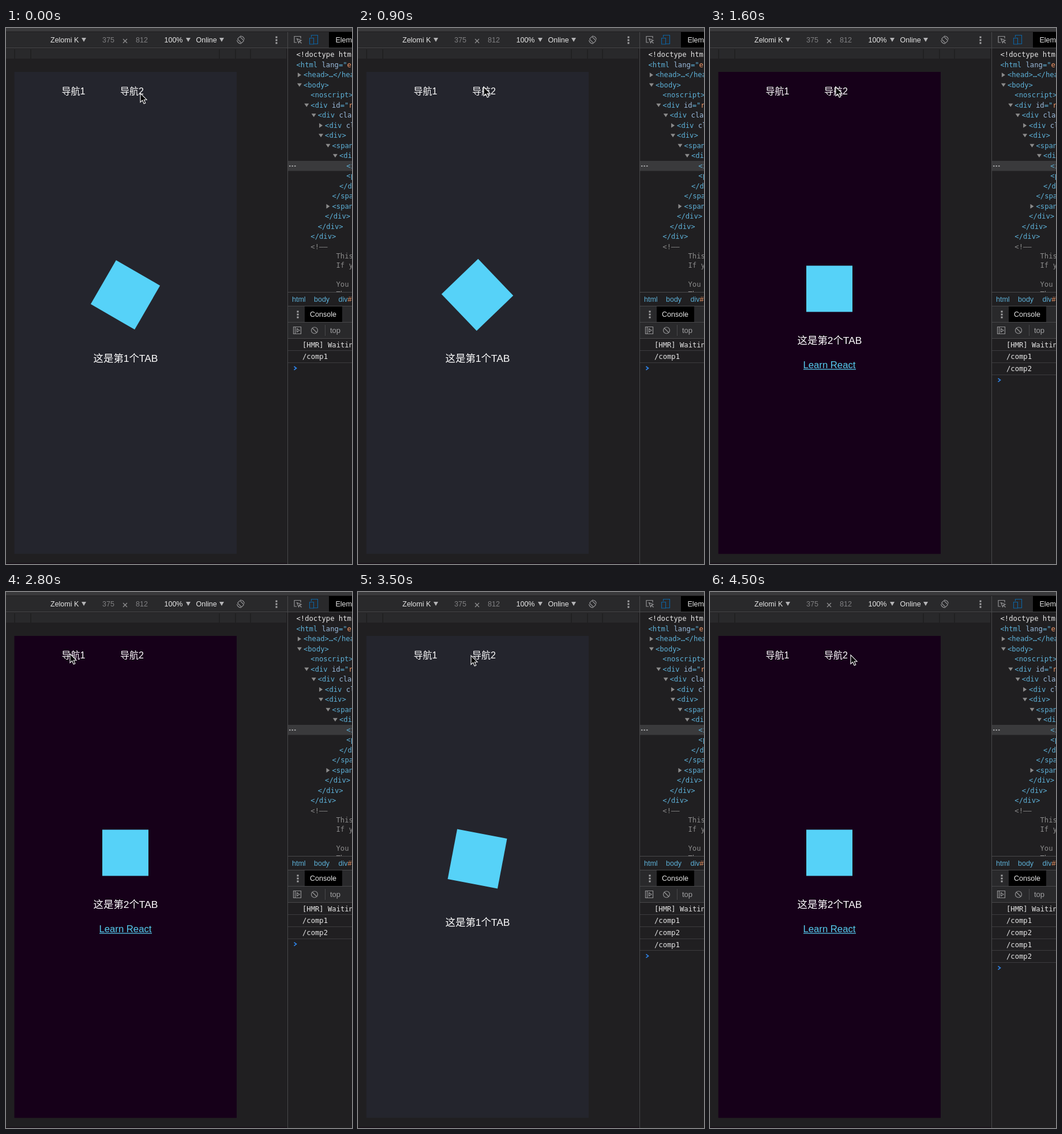
Write an HTML page that moves like this. It is 600 px wide and 928 px high and loops after 4.6 s.

```html
<!DOCTYPE html>
<html lang="zh">
<meta charset="utf-8">
<style>
html, body { margin: 0; height: 100%; overflow: hidden; background: #201f21 }
svg { display: block; font: 12.5px "Liberation Sans", Arial, sans-serif; fill: #e6e6e6 }
.cjk { font-family: "Liberation Sans", "Noto Sans CJK SC", "Noto Sans CJK", sans-serif; fill: #fff }
.mono { font: 12.2px "DejaVu Sans Mono", monospace }
.tag { fill: #5db0d7 }
.attr { fill: #9bbbdc }
.val { fill: #f29766 }
.dim { fill: #8b8b8b }
.rule { stroke: #48484a; fill: none }
.icon { stroke: #929294; fill: none; stroke-width: 1.2 }
</style>
<svg width="600" height="928" viewBox="0 0 600 928">
  <path fill="#39393b" d="M0 0H600V6H0Z"/>
  <path fill="#29292b" d="M0 7H600V34H0ZM0 36H486V53H0Z"/>
  <path stroke="#1f1f21" stroke-width="1.5" d="M15 37V53M43 37V53M370 37V53M398 37V53M424 37V53"/>
  <path fill="#1a131a" d="M0 926H488V928H0Z"/>

  <!-- device toolbar -->
  <text x="77" y="25">Zelomi K</text>
  <text x="167" y="25" fill="#818183">375</text>
  <text x="225" y="25" fill="#818183">812</text>
  <text x="274.5" y="25">100%</text>
  <text x="329.5" y="25">Online</text>
  <path fill="#b4b4b6" d="M131 17h8l-4 7zM312 17h8l-4 7zM370 17h8l-4 7z"/>
  <path class="icon" d="M203 19l7 7m0-7l-7 7"/>
  <g class="icon">
    <rect x="404" y="15.5" width="6" height="10" rx="1" transform="rotate(-45 407 20.5)"/>
    <path d="M406 14.2A6.5 6.5 0 0 1 413.4 20M408 26.8A6.5 6.5 0 0 1 400.6 21"/>
  </g>
  <path id="dots" fill="#a2a2a4" d="M467.5 14.5h3v3h-3zM467.5 19.5h3v3h-3zM467.5 24.5h3v3h-3z"/>

  <!-- phone -->
  <rect id="screen" x="14.5" y="76" width="385.5" height="834.5"/>
  <rect id="mark1" x="97" y="97" width="40" height="22" fill="#24527a"/>
  <rect id="mark2" x="198" y="97" width="42.5" height="22" fill="#24527a"/>
  <g class="cjk" font-size="16">
    <text id="nav1" x="96.5" y="114.5">导航1</text>
    <text id="nav2" x="198" y="114.5">导航2</text>
  </g>
  <rect id="logo" fill="#56d2f8"/>
  <text id="title" class="cjk" x="207.5" text-anchor="middle" font-size="17.4"></text>
  <g id="learn" fill="#56cdf0">
    <text x="161.5" y="589" font-size="16.7">Learn React</text>
    <path d="M162 590.3H253V591.5H162Z"/>
  </g>

  <!-- inspector -->
  <path fill="#201f21" d="M489 35H600V928H489Z"/>
  <path fill="#3a3a3c" d="M489 230H600V247.5H489Z"/>
  <g class="mono" id="tree"></g>
  <path fill="#a0a0a2" d="M491 238h2.5v2h-2.5zM495.5 238h2.5v2h-2.5zM500 238h2.5v2h-2.5z"/>
  <path fill="#201f21" d="M489 458H600V481H489Z"/>
  <path fill="#29292b" d="M489 482H600V537H489Z"/>
  <path fill="#000" d="M560 7H600V34H560ZM518 482H583V509H518Z"/>
  <text x="571.5" y="25">Elements</text>
  <g class="tag">
    <text x="496" y="474">html</text>
    <text x="534" y="474">body</text>
    <text x="576.5" y="474">div<tspan class="val">#root</tspan></text>
  </g>
  <use href="#dots" x="37" y="475"/>
  <text x="527" y="500">Console</text>
  <text x="562" y="528" font-size="13" fill="#a0a0a2">top</text>
  <path class="rule" d="M488.5 7V928M0 34.5H600M489 457.5H600M489 481.5H600M489 509.5H600M489 537.5H600M553.5 514V533"/>
  <g class="icon">
    <path d="M504 25H500V14.5H511V18M504.5 18.5l7.5 3-3 1.2-1.5 3zM508.5 22.5l4 4"/>
    <path stroke="#0e629f" d="M529.5 16V12.5H540.5V27.5H534M526.5 17.5H533.5V28H526.5Z"/>
    <path d="M498.5 517.5H511.5V529.5H498.5ZM501.5 517.5V529.5M504.5 520.5l4.5 3-4.5 3z"/>
    <circle cx="535" cy="523.5" r="5.5"/>
    <path d="M531 519.5l8 8"/>
  </g>
  <g class="mono" id="log"></g>
  <path id="prompt" d="M499.5 -3l4 3-4 3" fill="none" stroke="#2e86ee" stroke-width="1.6"/>

  <path id="cursor" d="M0 0V15.5L3.6 12.2 6.2 18 8.8 16.9 6.3 11.2H11Z" fill="#000" stroke="#fff" stroke-width="1.1"/>
</svg>
<script>
const $ = id => document.getElementById(id);
const set = (id, attrs) => { for (const k in attrs) $(id).setAttribute(k, attrs[k]); };
const show = (id, on) => set(id, { visibility: on ? 'visible' : 'hidden' });
const esc = s => s.replace(/</g, '&lt;');

// Element tree: depth, arrow (v open, > closed), tag, attribute, value
const rows = [
  [0, '', '<!doctype html>'], [0, '', '<html', 'lang', 'en'], [1, '>', '<head>…</head>'], [1, 'v', '<body>'],
  [2, '', '<noscript>'], [2, 'v', '<div', 'id', 'root'], [3, 'v', '<div', 'class', 'App'],
  [4, '>', '<div', 'class', 'nav'], [4, 'v', '<div>'], [5, 'v', '<span>'], [6, 'v', '<div>'],
  [7, '', '<img'], [7, '', '<p>'], [6, '', '</div>'], [5, '', '</span>'], [5, '>', '<span>'],
  [4, '', '</div>'], [3, '', '</div>'], [2, '', '</div>'], [2, '', '<!––']
];
let html = rows.map(([depth, arrow, tag, attr, val], i) => {
  const x = 503.5 + depth * 12.4, y = 50.3 + i * 17.5;
  const tri = arrow == 'v' ? `M${x - 11} ${y - 7}h8l-4 6z` : `M${x - 10} ${y - 8}v8l6-4z`;
  const cls = i == 0 ? 'doc' : tag == '<!––' ? 'dim' : 'tag';
  return `<text class="${cls}" x="${x}" y="${y}">${esc(tag)}` +
    (attr ? ` <tspan class="attr">${attr}</tspan>="<tspan class="val">${val}</tspan>"` : '') + '</text>' +
    (arrow ? `<path class="dim" d="${tri}"/>` : '');
}).join('');
['This HTML', 'If you', '', 'You can', 'The build'].forEach((s, i) => {
  html += `<text class="dim" x="572.5" y="${398.5 + i * 16.5}">${s}</text>`;
});
$('tree').innerHTML = html;

const line = i => 548.3 + i * 20.6;
$('log').innerHTML = ['[HMR] Waiting', '/comp1', '/comp2', '/comp1', '/comp2'].map((s, i) =>
  `<g><text x="514" y="${line(i) + 4.5}">${s}</text><path class="rule" stroke-opacity=".7" d="M489 ${Math.round(line(i) + 10) + .5}H600"/></g>`
).join('');

// Times at which the other tab opens
const switches = [1400, 2900, 3800];
// Pointer stops: time, x, y
const path = [[0, 233, 113], [400, 226, 97], [900, 218, 102], [1900, 218, 102], [2400, 104, 108],
  [2800, 111, 107], [3100, 111, 107], [3500, 196, 110], [3800, 208, 112], [4200, 208, 112], [4500, 244, 109], [4600, 244, 109]];

function pointer(t) {
  const i = path.findIndex(p => p[0] > t), [t0, x0, y0] = path[i - 1], [t1, x1, y1] = path[i];
  const u = (t - t0) / (t1 - t0), e = u * u * (3 - 2 * u);
  return `translate(${x0 + (x1 - x0) * e} ${y0 + (y1 - y0) * e})`;
}

function mark(n, on) {
  show('mark' + n, on);
  $('nav' + n).style.fill = on ? '#a9c6dc' : '#fff';
}

function draw(now) {
  const t = Math.floor(now % 4600 / 100) * 100;
  const count = switches.filter(s => t >= s).length, first = count % 2 == 0;
  const size = first ? 88 : 80, cy = first ? 462 : 451.5;
  const angle = !first ? 0 : t < 2900 ? 30 + t * .018 : (t - 2900) * .018;

  set('screen', { fill: first ? '#24252d' : '#160019' });
  set('logo', { x: 207 - size / 2, y: cy - size / 2, width: size, height: size, transform: `rotate(${angle} 207 ${cy})` });
  set('title', { y: first ? 577.5 : 547 });
  $('title').textContent = `这是第${first ? 1 : 2}个TAB`;
  show('learn', !first);
  mark(1, t >= 2900 && t < 3200);
  mark(2, t >= 3800 && t < 4100);
  [...$('log').children].forEach((g, i) => g.setAttribute('visibility', i < count + 2 ? 'visible' : 'hidden'));
  set('prompt', { transform: `translate(0 ${line(count + 2) - .5})` });
  set('cursor', { transform: pointer(t) });
}

const start = performance.now();
function tick() {
  draw(performance.now() - start);
  requestAnimationFrame(tick);
}
tick();
</script>
</html>
```
